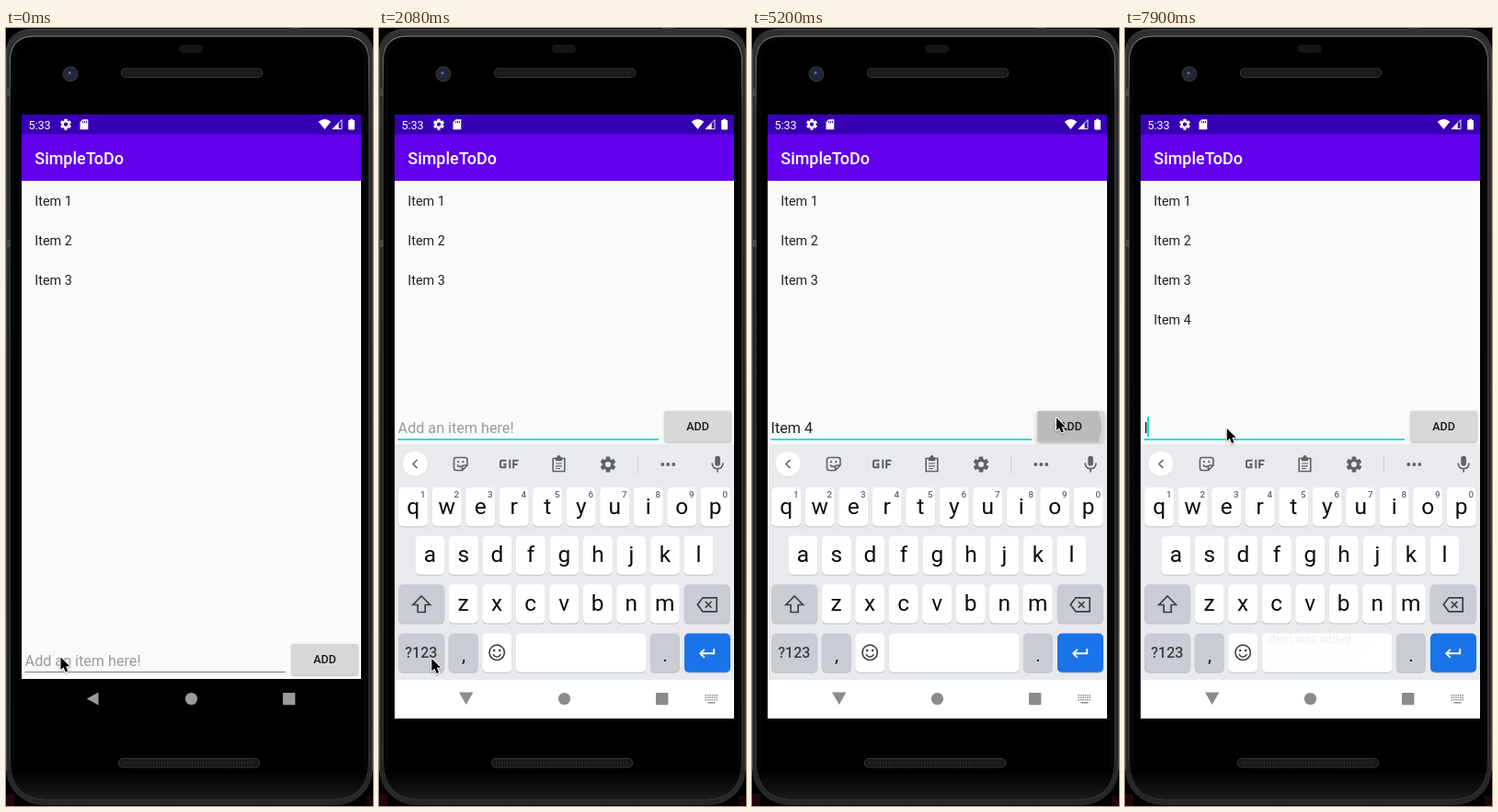
These frames come from a looping animation (399 by 845 pixels, 8000 ms). An HTML page with a canvas:

```html
<!DOCTYPE html>
<html lang="en">
<head>
<meta charset="utf-8">
<title>To-do list demo</title>
<style>
html, body { margin: 0; width: 100%; height: 100%; overflow: hidden; background: #000; }
canvas { display: block; width: 399px; height: 845px; }
</style>
</head>
<body>
<canvas id="stage"></canvas>
<script>
const W = 399, H = 845, LOOP = 8000;
const TEAL = '#03dac5', ICON = '#5f6368', KB_BG = '#e8eaed';
const dpr = window.devicePixelRatio || 1;
const stage = setup(document.getElementById('stage'));
const layer = setup(document.createElement('canvas'));
let g = stage;

function setup(canvas) {
  canvas.width = Math.round(W * dpr);
  canvas.height = Math.round(H * dpr);
  const ctx = canvas.getContext('2d');
  ctx.scale(dpr, dpr);
  return ctx;
}

// Value of the latest [time, value] step that has begun
function at(t, steps) {
  let v = steps[0][1];
  for (const [start, value] of steps) if (t >= start) v = value;
  return v;
}

function rect(x, y, w, h, fill, r = 0) {
  g.beginPath();
  g.roundRect(x, y, w, h, r);
  g.fillStyle = fill;
  g.fill();
}

function circle(x, y, r, fill) {
  g.beginPath();
  g.arc(x, y, r, 0, Math.PI * 2);
  g.fillStyle = fill;
  g.fill();
}

function poly(points, fill) {
  g.beginPath();
  points.forEach(([x, y]) => g.lineTo(x, y));
  g.closePath();
  g.fillStyle = fill;
  g.fill();
}

function stroke(path, color, width = 1.6) {
  g.strokeStyle = color;
  g.lineWidth = width;
  g.stroke(new Path2D(path));
}

function text(s, x, y, size, color, weight = 400, align = 'left') {
  g.font = `${weight} ${size}px Roboto, sans-serif`;
  g.textAlign = align;
  g.fillStyle = color;
  g.fillText(s, x, y);
}

function fade(x, y, x2, y2, ...colors) {
  const grad = g.createLinearGradient(x, y, x2, y2);
  colors.forEach((c, i) => grad.addColorStop(i / (colors.length - 1), c));
  return grad;
}

function gear(x, y, r, color, hole) {
  g.save();
  g.translate(x, y);
  for (let i = 0; i < 6; i++) {
    g.rotate(Math.PI / 3);
    rect(-r * 0.27, -r, r * 0.54, r, color, r * 0.1);
  }
  circle(0, 0, r * 0.74, color);
  circle(0, 0, r * 0.36, hole);
  g.restore();
}

function speaker(x, y) {
  rect(x, y, 154, 10.5, '#3b3b3b', 5);
  rect(x + 1, y + 1, 152, 8.5, '#171717', 4);
  for (let i = 0; i < 48; i++) rect(x + 5 + i * 3, y + 3, 1.4, 4.5, '#282828');
}

function phone() {
  rect(0, 0, W, H, '#000');
  rect(0, 832, 9, 13, '#20060c');
  rect(391, 834, 8, 11, '#1c050a');
  rect(0, 1, W, 843, fade(0, 0, 0, H, '#2e3130', '#222423', '#262827'), [28, 28, 40, 40]);
  stroke('M0.5 806V28Q1 2 29 1.5H370Q398 2 398.5 28V806', '#474a48', 1);
  rect(4, 9, 391, 829, '#050505', [25, 25, 38, 38]);
  rect(10, 13, 379, 822, '#000', [22, 22, 34, 34]);
  rect(6, 806, 387, 31, fade(0, 806, 0, 837, '#000', '#191a1a'), [0, 0, 36, 36]);
  stroke('M4.5 90V34Q6 9 30 9H369Q393 9 394.5 34V90', fade(0, 9, 0, 90, '#868b88', '#343635'), 1);
  stroke('M4.5 90V798Q6 838 44 838H355Q393 838 394.5 798V90', '#343635', 1);
  for (const y of [66, 230]) rect(0, y, 5, 8, '#454846');
  rect(308, 0, 12, 8, '#303332');
  rect(188, 18, 26, 9, '#151515', 4.5);
  speaker(125, 43.5);
  speaker(122, 793);
  circle(70, 50, 8.5, '#303235');
  circle(70, 50, 7, '#22252d');
  circle(70, 50, 4, '#1d2747');
  circle(69, 48.8, 1.5, '#5f70a4');
}

function statusBar() {
  rect(17, 94, 369, 22, '#3700b3');
  rect(17, 115.5, 369, 50.5, '#6200ee');
  text('5:33', 24.4, 109.7, 12.57, '#fff');
  gear(65, 104.7, 6, '#fff', '#3700b3');
  poly([[83.5, 99.3], [89.3, 99.3], [89.3, 110.3], [80.5, 110.3], [80.5, 102.3]], '#fff');
  for (let i = 0; i < 3; i++) rect(83.2 + i * 1.9, 101, 1, 2.3, '#3700b3');
  g.beginPath();
  g.moveTo(346.5, 110);
  g.lineTo(339.7, 101.7);
  g.quadraticCurveTo(346.5, 96.3, 353.3, 101.7);
  g.fillStyle = '#fff';
  g.fill();
  stroke('M365 99.7V109.6H355.2Z', '#fff', 0.9);
  poly([[361.7, 102.8], [361.7, 110], [354.6, 110]], '#fff');
  rect(372.2, 100, 6.8, 10.4, '#fff', 0.8);
  rect(374.1, 98.8, 3, 1.5, '#fff');
  text('SimpleToDo', 31.3, 147.5, 17.96, '#fff', 500);
}

function addButton(t, dy) {
  const y = 669 + dy, pressed = t >= 5050 && t < 5650;
  g.save();
  g.shadowColor = 'rgba(0,0,0,.3)';
  g.shadowBlur = (pressed ? 5 : 2.5) * dpr;
  g.shadowOffsetY = (pressed ? 2 : 1) * dpr;
  rect(310.5, y, 72.3, 33.5, '#d6d7d7', 1.8);
  g.restore();
  if (pressed) {
    g.save();
    g.beginPath();
    g.roundRect(310.5, y, 72.3, 33.5, 1.8);
    g.clip();
    const r = at(t, [[5050, 22], [5200, 40], [5350, 60]]);
    const a = at(t, [[5050, 0.13], [5500, 0.06]]);
    circle(340, y + 17, r, `rgba(0,0,0,${a})`);
    g.restore();
  }
  text('ADD', 346.6, 690 + dy, 12.57, '#1c1c1c', 500, 'center');
}

function caretOn(t) {
  return at(t, [[0, 0], [600, 1], [1190, 0], [1640, 1], [2080, 0], [2520, 1], [3410, 0],
    [3560, 1], [4000, 0], [4450, 1], [4900, 0], [5500, 1], [5950, 0], [6400, 1],
    [6550, 0], [6700, 1], [7000, 0], [7450, 1]]);
}

function field(t, dy) {
  const value = at(t, [[0, ''], [2520, 'I'], [2670, 'It'], [2970, 'Item'], [3120, 'Item '],
    [3560, 'Item 4'], [5350, ''], [7900, 'I']]);
  const base = 692.8 + dy;
  text(value || 'Add an item here!', 20.6, base, 16.16, value ? '#212121' : '#9a9a9a');
  g.font = '400 16.16px Roboto, sans-serif';
  if (t >= 2670 && t < 3410) {
    rect(20.6, base + 1.4, g.measureText(value.trim()).width, 1, '#333');
  }
  if (t < 600) rect(20.5, 699 + dy, 283.5, 1, '#7b7b7b');
  else rect(20.5, 699 + dy, 283.5, 1.8, TEAL);
  if (caretOn(t)) rect(Math.max(20.4, 19.8 + g.measureText(value).width), 675.3 + dy, 1.8, 21.6, TEAL);
}

function app(t) {
  rect(17, 166, 369, 541, '#fafafa');
  const count = t < 5350 ? 3 : 4;
  for (let i = 0; i < count; i++) text('Item ' + (i + 1), 31.3, 193 + i * 43.1, 14.37, '#212121');
  const dy = t < 900 ? 0 : -253;
  field(t, dy);
  addButton(t, dy);
}

function navIcons(color, open) {
  poly(open ? [[87, 721.5], [102.4, 721.5], [94.7, 735]] : [[87.8, 728.5], [100.5, 721.5], [100.5, 735.5]], color);
  circle(201.5, 728.5, 6.6, color);
  rect(301, 722, 13.4, 13.2, color, 1);
  if (!open) return;
  for (let row = 0; row < 3; row++)
    for (let i = 0; i < 6; i++) rect(354.5 + i * 2.4, 724 + row * 2.5, 1.5, 1.5, color);
  rect(357.5, 732, 8, 1.5, color);
}

function key(x, y, w, fill = '#fff') {
  rect(x, y + 1, w, 42.3, '#bfc2c7', 5);
  rect(x, y, w, 42.2, fill, 5);
}

function mic() {
  rect(365.3, 464.8, 5.6, 11, ICON, 2.8);
  stroke('M362.2 472.5Q362.4 478.4 368.1 478.6Q373.8 478.4 374 472.5M368.1 478.5V482.5', ICON, 1.7);
}

function toolbar() {
  stroke('M41.5 469L37 473.5L41.5 478', ICON);
  stroke('M84 466.5H93.5Q96 466.5 96 469V475L90.5 480.5H84Q81.5 480.5 81.5 478V469Q81.5 466.5 84 466.5ZM96 475H92.5Q90.5 475 90.5 477V480.5M85 474.5Q87 477.6 90 475.7', ICON);
  circle(86, 471.2, 1.1, ICON);
  circle(91.3, 471.2, 1.1, ICON);
  stroke('M138.5 469.8H133.5Q132 469.8 132 471.3V475.7Q132 477.2 133.5 477.2H137.4V473.8H135.3M142.3 468.8V478.2M146.2 478.2V469.8H151.6M146.2 473.9H150.6', ICON, 2);
  stroke('M189.2 467.5H201.8V481.5H189.2Z', ICON);
  rect(191.8, 466.3, 7.4, 4, ICON, 1);
  circle(195.5, 465.8, 1.9, ICON);
  stroke('M192 473H199M192 475.8H199M192 478.5H197', ICON, 1.2);
  gear(249, 474, 8.4, ICON, KB_BG);
  rect(281, 464, 1, 20, '#cdd0d4');
  for (const x of [308.3, 314.3, 320.3]) circle(x, 474, 1.9, ICON);
}

function suggestions(words) {
  stroke('M37 469L41.5 473.5L37 478', ICON);
  words.forEach((w, i) => text(w, 98.3 + i * 102, 479.7, 16, '#55595e', 400, 'center'));
  rect(146, 463, 1, 21, '#c5c8cc');
  rect(254, 463, 1, 21, '#c5c8cc');
}

function keyRow(letters, x, y, upper) {
  [...letters].forEach((c, i) => {
    const kx = x + i * 36.5;
    key(kx, y, 32);
    text(upper ? c.toUpperCase() : c, kx + 16, y + 28.6, 24.5, '#0c0c0c', 400, 'center');
  });
}

function keyboard(t) {
  const upper = (t >= 2230 && t < 2520) || (t >= 7600 && t < 7900);
  const special = '#c9ccd3', dark = '#3c4043';
  rect(17, 452, 369, 256, KB_BG);
  rect(17, 708, 369, 42, '#fff');
  circle(39.2, 474.1, 13.6, '#d4d6d9');
  circle(39.2, 473.4, 13.5, '#fff');
  const words = at(t, [[0, null], [2670, ['It', 'It’s', 'Its']], [2970, ['Item', 'Items', 'Itemized']], [3410, null]]);
  if (words) suggestions(words); else toolbar();
  mic();
  keyRow('qwertyuiop', 21.2, 499, upper);
  for (let i = 0; i < 10; i++) text((i + 1) % 10, 47.8 + i * 36.5, 510, 9.8, ICON, 500, 'center');
  keyRow('asdfghjkl', 39.4, 551.5, upper);
  keyRow('zxcvbnm', 75.7, 604.3, upper);

  key(21.2, 604.3, 50, special);
  const arrow = new Path2D('M46.2 617L55.5 626.5H50.2V634.5H42.2V626.5H36.9Z');
  if (upper) { g.fillStyle = dark; g.fill(arrow); }
  stroke(arrow, dark, 1.7);
  key(331.8, 604.3, 50, special);
  stroke('M352 618.8H367.2V633.8H352L346.3 626.3ZM354.8 623L361.4 629.6M361.4 623L354.8 629.6', dark, 1.7);

  key(21.2, 657.5, 50, special);
  text('?123', 45.8, 684.3, 16, dark, 500, 'center');
  key(75.7, 657.5, 32, special);
  text(',', 92, 687.5, 21, '#1c1c1c', 400, 'center');
  key(112.2, 657.5, 32);
  g.beginPath();
  g.arc(128.2, 678.3, 8.2, 0, Math.PI * 2);
  g.strokeStyle = dark;
  g.lineWidth = 1.6;
  g.stroke();
  circle(125.2, 676, 1.3, dark);
  circle(131.2, 676, 1.3, dark);
  stroke('M123.8 680.3Q128.2 686 132.6 680.3', dark, 1.5);
  key(148.8, 657.5, 141.6);
  key(294.9, 657.5, 32, special);
  text('.', 311, 688, 21, '#1c1c1c', 400, 'center');
  key(332, 657.5, 50, '#1a73e8');
  stroke('M364.2 674.3V679.3H349.5M353.8 674.8L349.3 679.3L353.8 683.8', '#fff', 1.9);
}

function drawKeyboard(t) {
  rect(17, 707, 369, 43, '#000');
  if (t < 1040) return navIcons('#9b9b9b', t >= 900);
  const [offset, alpha] = at(t, [[1040, [164.5, 0.33]], [1190, [30, 0.85]], [1340, [0, 1]]]);
  g = layer;
  g.clearRect(0, 0, W, H);
  keyboard(t);
  g = stage;
  g.save();
  g.beginPath();
  g.rect(17, 166, 369, 584);
  g.clip();
  g.globalAlpha = alpha;
  g.drawImage(layer.canvas, 0, offset, W, H);
  g.restore();
  navIcons(alpha < 0.5 ? 'rgba(140,140,140,.6)' : '#8b8b8b', true);
}

function toast(t) {
  const alpha = at(t, [[0, 0], [5800, 0.35], [5950, 0.8], [6100, 1], [7600, 0.65], [7750, 0.3], [7900, 0.07]]);
  if (!alpha) return;
  g.save();
  g.globalAlpha = alpha;
  rect(134.5, 645.5, 133.5, 39.5, '#ededee', 19.7);
  text('Item was added', 156.8, 668.4, 12.57, '#202020');
  g.restore();
}

function pointer(t) {
  const [x, y] = at(t, [[0, [59.5, 683.5]], [150, [57.3, 685]], [4000, [96, 660]], [4150, [205, 560]],
    [4300, [304, 452]], [4450, [331, 423.5]], [5800, [262, 427]], [5950, [152, 433]], [6100, [110.8, 435]]]);
  g.save();
  g.translate(x, y);
  const arrow = new Path2D('M0 0V13.6L3.1 10.7L5.3 16L7.8 15L5.6 9.8H9.9Z');
  g.lineJoin = 'round';
  g.shadowColor = 'rgba(0,0,0,.3)';
  g.shadowBlur = 2 * dpr;
  g.shadowOffsetY = dpr;
  stroke(arrow, '#fff', 2);
  g.shadowColor = 'transparent';
  g.fillStyle = '#000';
  g.fill(arrow);
  g.restore();
}

function draw(now) {
  const t = now % LOOP;
  phone();
  statusBar();
  app(t);
  drawKeyboard(t);
  toast(t);
  pointer(t);
}

const start = performance.now();
function tick() {
  draw(performance.now() - start);
  requestAnimationFrame(tick);
}
tick();
</script>
</body>
</html>
```
